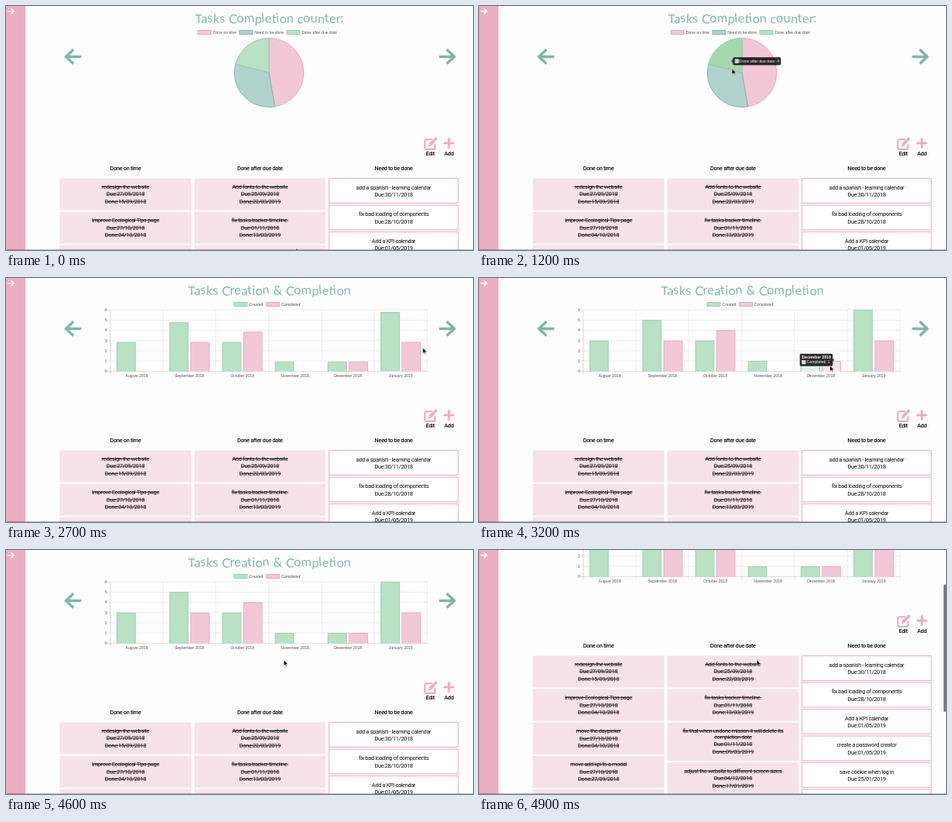
Write an HTML page that moves like this. It is 600 px wide and 315 px high and loops after 5 s.

```html
<!DOCTYPE html>
<html lang="en">
<head>
<meta charset="utf-8">
<title>Tasks tracker</title>
<style>
html, body { margin: 0; height: 100%; overflow: hidden; background: #fdfdfe; }
svg { display: block; width: 100vw; height: 100vh; }
text { fill: #111; }
.ui { font: 7.4px Roboto, sans-serif; letter-spacing: -.35px; text-anchor: middle; }
.head { font-weight: 500; }
.done { text-decoration: line-through .55px; }
.title { font: 16.2px Lato, sans-serif; letter-spacing: .15px; fill: #7db8aa; text-anchor: middle; }
.chart { font: 5.1px "Liberation Sans", Arial, sans-serif; fill: #555; }
.mid { text-anchor: middle; }
.tip text { font: 5.1px "Liberation Sans", Arial, sans-serif; fill: #fff; }
.tip .bold { font-weight: 700; }
.icon { fill: none; stroke: #7db8aa; stroke-width: 3.5; stroke-linecap: round; stroke-linejoin: round; }
.pink { stroke: #efa9bf; }

.first, .second, .bar, .arrow, .hand, #cursor, #page, #thumb, #scrollbar {
  animation: 5s linear infinite;
}
.first { animation-name: leave; }
.second { animation-name: enter; }
.bar { animation-name: grow; }
.arrow { animation-name: arrow; }
.hand { animation-name: hand; }
#cursor { animation-name: move; }
#page { animation-name: scroll; }
#thumb { animation-name: thumb; }
#scrollbar { animation-name: scrollbar; }

@keyframes leave { 0%, 41.69% { opacity: 1 } 41.7%, 100% { opacity: 0 } }
@keyframes enter { 0%, 41.69% { opacity: 0 } 41.7%, 100% { opacity: 1 } }
@keyframes grow {
  0%, 41.7% { transform: translateY(var(--h)); animation-timing-function: cubic-bezier(.165, .84, .44, 1) }
  61.7%, 100% { transform: none }
}
@keyframes arrow { 0%, 35.79% { opacity: 1 } 35.8%, 51.19% { opacity: 0 } 51.2%, 100% { opacity: 1 } }
@keyframes hand { 0%, 35.79% { opacity: 0 } 35.8%, 51.19% { opacity: 1 } 51.2%, 100% { opacity: 0 } }
@keyframes move {
  0% { transform: translate(373px, 313px) }
  12% { transform: translate(357px, 100px) }
  16% { transform: translate(341px, 108px) }
  20% { transform: translate(327px, 84px) }
  24% { transform: translate(325px, 81px) }
  28% { transform: translate(338px, 80px) }
  30% { transform: translate(385px, 79px) }
  36% { transform: translate(568px, 74px) }
  44%, 50% { transform: translate(570px, 72px) }
  51.2% { transform: translate(557px, 76px) }
  55% { transform: translate(528px, 95px) }
  56%, 58% { transform: translate(522px, 100px) }
  59.4% { transform: translate(463px, 111px) }
  64% { transform: translate(451px, 113px) }
  68.2% { transform: translate(437px, 114px) }
  70% { transform: translate(430px, 105px) }
  72.8% { transform: translate(370px, 116px) }
  74% { transform: translate(361px, 118px) }
  83% { transform: translate(360px, 117px) }
  88%, 100% { transform: translate(357px, 142px) }
}
@keyframes scroll { 0%, 93% { transform: none } 98%, 100% { transform: translateY(-86px) } }
@keyframes thumb { 0%, 93% { transform: none } 98%, 100% { transform: translateY(44px) } }
@keyframes scrollbar { 0%, 93% { opacity: 0 } 93.1%, 100% { opacity: 1 } }
</style>
</head>
<body>
<svg viewBox="0 0 600 315">
  <defs><clipPath id="plot"><rect x="130" y="38" width="415" height="82.3"/></clipPath></defs>
  <g id="page">
    <g id="pie" class="first"></g>
    <g id="bars" class="second"></g>
    <path class="icon" d="M95.2 65.4H77M85.6 57.2L77 65.4l8.6 8.2"/>
    <path class="icon" d="M557.8 65.4H576M567.4 57.2l8.6 8.2-8.6 8.2"/>
    <g class="icon pink">
      <path d="M547 172.2h-6.8a2 2 0 0 0-2 2v8.8a2 2 0 0 0 2 2h9a2 2 0 0 0 2-2v-4" style="stroke-width:2"/>
      <path d="M544.6 179.1l5.4-5.4" style="stroke-width:3.8;stroke-linecap:butt"/>
      <path d="M551.3 172.4l.7-.7" style="stroke-width:3.8"/>
      <path d="M543.2 177.7l-.6 3.6 3.6-.6z" style="stroke:none;fill:#efa9bf"/>
      <path d="M569 171.6v11M563.5 177.1h11" style="stroke-width:2.9"/>
    </g>
    <g id="table" class="ui"></g>
    <g id="tips"></g>
  </g>
  <rect width="25" height="315" fill="#edadc1"/>
  <path d="M2.5 6.8H10M7 3.6l3.2 3.2L7 10" fill="none" stroke="#fff" stroke-width="1.5" stroke-linecap="round"/>
  <rect y="314.3" width="600" height=".7" fill="#5a323c" opacity=".45"/>
  <g id="scrollbar"><rect id="thumb" x="596.8" y=".4" width="3.2" height="164.6" rx="1.4" fill="#7b7b7b"/></g>
  <g id="cursor">
    <path class="arrow" d="M0 0V7.4L1.7 5.8 2.9 8.5 4 8 2.8 5.4H5.1Z" stroke="#fff" stroke-width=".5"/>
    <path class="hand" d="M.2.8q.8-.9 1.5 0V3.2l3 .7q.8.3.6 1.4L4.8 8H1.4L-.9 5.2q-.2-.9.7-.7l.4.4Z" fill="#fff" stroke="#111" stroke-width=".7"/>
  </g>
</svg>
<script>
const LOOP = 5000, QUART = 'cubic-bezier(.165, .84, .44, 1)';
const GREEN = ['#b8e2c3', '#93d0a6', '#e2f3e6'];
const PINK = ['#f3c8d6', '#eca5be', '#fae3ea'];
const TEAL = ['#b1d3cd', '#7ab5a8'];
const $ = id => document.getElementById(id);

function add(parent, tag, attrs, content) {
  const el = document.createElementNS('http://www.w3.org/2000/svg', tag);
  for (const k in attrs) el.setAttribute(k, attrs[k]);
  if (content !== undefined) el.textContent = content;
  parent.append(el);
  return el;
}
const label = (g, x, y, s, cls) => add(g, 'text', { x, y, class: cls }, s);
const box = (g, x, y, width, height, [fill, stroke], w = .9) =>
  add(g, 'rect', { x, y, width, height, fill, stroke, 'stroke-width': w });

// Title with slightly uneven, hand-lettered characters
function title(g, s) {
  const wave = [...s].map((_, i) => Math.sin(i * 2.3));
  const lift = wave.map((v, i) => ((v - (wave[i - 1] || 0)) * .5).toFixed(2));
  add(g, 'text', { x: 338.5, y: 21.5, class: 'title', rotate: wave.map(v => (v * 5).toFixed(1)).join(' '), dy: lift.join(' ') }, s);
}
function legend(g, items) {
  for (const [x, s, color] of items) {
    box(g, x, 31.5, 17, 5, color);
    label(g, x + 19.3, 35.9, s, 'chart');
  }
}

// Pie
const pie = $('pie'), CX = 338, CY = 86, R = 44.5;
title(pie, 'Tasks Completion counter:');
legend(pie, [[246.5, 'Done on time', PINK], [300, 'Need to be done', TEAL], [360.7, 'Done after due date', GREEN]]);
const polar = (turn, r) => [CX + r * Math.sin(turn * 2 * Math.PI), CY - r * Math.cos(turn * 2 * Math.PI)];
let turn = 0;
const slices = [[9, PINK, '#efb3c8'], [6, TEAL, '#9cc7bf'], [4, GREEN, '#a6d8b0']].map(([n, c, hot]) => {
  const a = turn, b = turn += n / 19;
  const el = add(pie, 'path', {
    d: `M${CX} ${CY}L${polar(a, R)}A${R} ${R} 0 0 1 ${polar(b, R)}Z`,
    fill: c[0], stroke: c[1], 'stroke-width': 1, 'stroke-linejoin': 'round'
  });
  return { el, hot, mid: polar((a + b) / 2, R / 2) };
});

// Bars
const bars = $('bars'), X0 = 134, X1 = 541, Y0 = 120.3, UNIT = 13.2, STEP = (X1 - X0) / 6;
title(bars, 'Tasks Creation & Completion');
legend(bars, [[293, 'Created', GREEN], [334.3, 'Completed', PINK]]);
const rule = (d, o) => add(bars, 'path', { d, stroke: '#000', 'stroke-width': .5, opacity: o });
for (let v = 0; v <= 6; v++) {
  rule(`M130 ${Y0 - v * UNIT}H${X1}`, v ? .12 : .3);
  label(bars, 127, Y0 - v * UNIT + 1.8, v, 'chart');
}
for (let i = 0; i <= 6; i++) rule(`M${X0 + i * STEP} 41V124.5`, i ? .12 : .3);
const plot = add(bars, 'g', { 'clip-path': 'url(#plot)' });
const bar = (cx, side, v, c) => {
  const x = cx + side * STEP * .2 - STEP * .18, h = v * UNIT;
  const el = box(plot, x + .4, Y0 - h + .4, STEP * .36 - .8, h + 3, c);
  el.setAttribute('class', 'bar');
  el.style.setProperty('--h', h + 1 + 'px');
  return { el, hot: c[2], mid: [x + STEP * .18, Y0 - h] };
};
const months = [['August 2018', 3, 0], ['September 2018', 5, 3], ['October 2018', 3, 4],
  ['November 2018', 1, 0], ['December 2018', 1, 1], ['January 2019', 6, 3]].map(([name, made, done], i) => {
  const cx = X0 + (i + .5) * STEP;
  label(bars, cx, 128.2, name, 'chart mid');
  return { name, made: made && bar(cx, -1, made, GREEN), done: done && bar(cx, 1, done, PINK) };
});
const [, , , nov, dec, jan] = months;

// Task table
const table = $('table');
label(table, 545, 193, 'Edit', 'head');
label(table, 569, 193, 'Add', 'head');
function column(x, w, head, tasks, done) {
  const mid = x + w / 2;
  let y = 222.6;
  label(table, mid, 212.2, head, 'head');
  for (const [name, due, end] of tasks) {
    const names = name.split('|');
    const h = done ? 40.9 + (names.length - 1) * 8.4 : 31.9;
    box(table, x, y, w, h, done ? ['#f7e2ea', 'none'] : ['#fff', '#efafc2'], 1.1);
    const lines = [...names, 'Due:' + due];
    if (end) lines.push('Done:' + end);
    let ty = y + (done ? 13.2 : 13.9);
    lines.forEach((s, i) => {
      label(table, mid, ty, s, done ? 'done' : '');
      ty += i < names.length - 1 ? 7.7 : 9.6;
    });
    y += h + (done ? 2.2 : 2.6);
  }
}
column(69, 169, 'Done on time', [
  ['redesign the website', '27/09/2018', '15/09/2018'],
  ['Improve Ecological Tips page', '27/10/2018', '04/10/2018'],
  ['move the daypicker', '27/10/2018', '04/10/2018'],
  ['move add kpi to a modal', '27/10/2018', '27/09/2018'],
  ['']
], true);
column(242, 168.5, 'Done after due date', [
  ['Add fonts to the website', '25/09/2018', '22/03/2019'],
  ['fix tasks tracker timeline.', '01/11/2018', '13/03/2019'],
  ['fix that when undone misson it will delete its|completion date', '01/11/2018', '09/03/2019'],
  ['adjust the website to different screen sizes', '04/12/2018', '17/01/2019']
], true);
column(415, 166, 'Need to be done', [
  ['add a spanish - learning calendar', '30/11/2018'],
  ['fix bad loading of components', '28/10/2018'],
  ['Add a KPI calendar', '01/05/2019'],
  ['create a password creator', '01/05/2019'],
  ['save cookie when log in', '25/01/2019'],
  ['']
]);

// Hover states and tooltips: [start, end, shape, colours, text, heading, extra hot shape]
const hovers = [
  [520, 800, slices[0], PINK, 'Done on time: 9'],
  [800, 1000, slices[1], TEAL, 'Need to be done: 6'],
  [1000, 1400, slices[2], GREEN, 'Done after due date: 4'],
  [1400, 1500, slices[0], PINK, 'Done on time: 9'],
  [2750, 2970, jan.done, PINK, 'Completed: 3', jan.name],
  [2970, 3410, dec.done, PINK, 'Completed: 1', dec.name, dec.made],
  [3410, 3500, dec.made, GREEN, 'Created: 1', dec.name],
  [3650, 4180, nov.made, GREEN, 'Created: 1', nov.name]
];
const play = (el, frames) => el.animate(
  frames.map(([t, props]) => ({ offset: t / LOOP, ...props })),
  { duration: LOOP, iterations: Infinity });

function heat({ el, hot }, start, end) {
  const copy = el.cloneNode();
  copy.removeAttribute('class');
  copy.setAttribute('fill', hot);
  el.after(copy);
  const off = { opacity: 0 }, on = { opacity: 1 };
  play(copy, [[0, off], [start, off], [start, on], [end, on], [end, off], [LOOP, off]]);
}

function tooltip(shape, color, text, heading) {
  const g = add($('tips'), 'g', { class: 'tip' });
  const back = add(g, 'rect', { rx: 1.8, fill: '#000', opacity: .83 });
  const h = heading ? 16.2 : 10.2;
  const [x, y] = shape.mid, onLeft = x > CX;
  const head = heading ? label(g, 2.5, 6.4, heading, 'bold').getComputedTextLength() : 0;
  box(g, 2.8, h - 7.4, 4.6, 4.6, [color[0], '#fff'], .5);
  const body = label(g, 8.6, h - 3.3, text).getComputedTextLength() + 6.1;
  const w = Math.max(head, body) + 5;
  back.setAttribute('width', w);
  back.setAttribute('height', h);
  const edge = onLeft ? w : 0, tipX = onLeft ? w + 2.1 : -2.1;
  add(g, 'path', { d: `M${edge} ${h / 2 - 2.1}L${tipX} ${h / 2}L${edge} ${h / 2 + 2.1}Z`, opacity: .83 });
  return { g, at: `translate(${x - tipX}px, ${y - h / 2}px)` };
}

let last;
hovers.forEach(([start, end, shape, color, text, heading, extra], i) => {
  heat(shape, start, end);
  if (extra) heat(extra, start, end);
  const { g, at } = tooltip(shape, color, text, heading);
  const before = hovers[i - 1], after = hovers[i + 1];
  const chained = before && before[1] === start;
  const sameChart = before && !before[5] === !heading;
  const from = sameChart ? last : at;
  const settle = Math.min(start + 400, end);
  const gone = !after ? end + 400 : after[0] === end ? end : Math.min(end + 400, after[0]);
  const off = { opacity: 0 };
  play(g, [
    [0, { ...off, transform: from }],
    [start, { ...off, transform: from }],
    [start, { opacity: chained ? 1 : 0, transform: from, easing: QUART }],
    [settle, { opacity: 1, transform: at }],
    [end, { opacity: 1, transform: at, easing: QUART }],
    [gone, { ...off, transform: at }],
    [LOOP, { ...off, transform: at }]
  ]);
  last = at;
});
</script>
</body>
</html>
```
